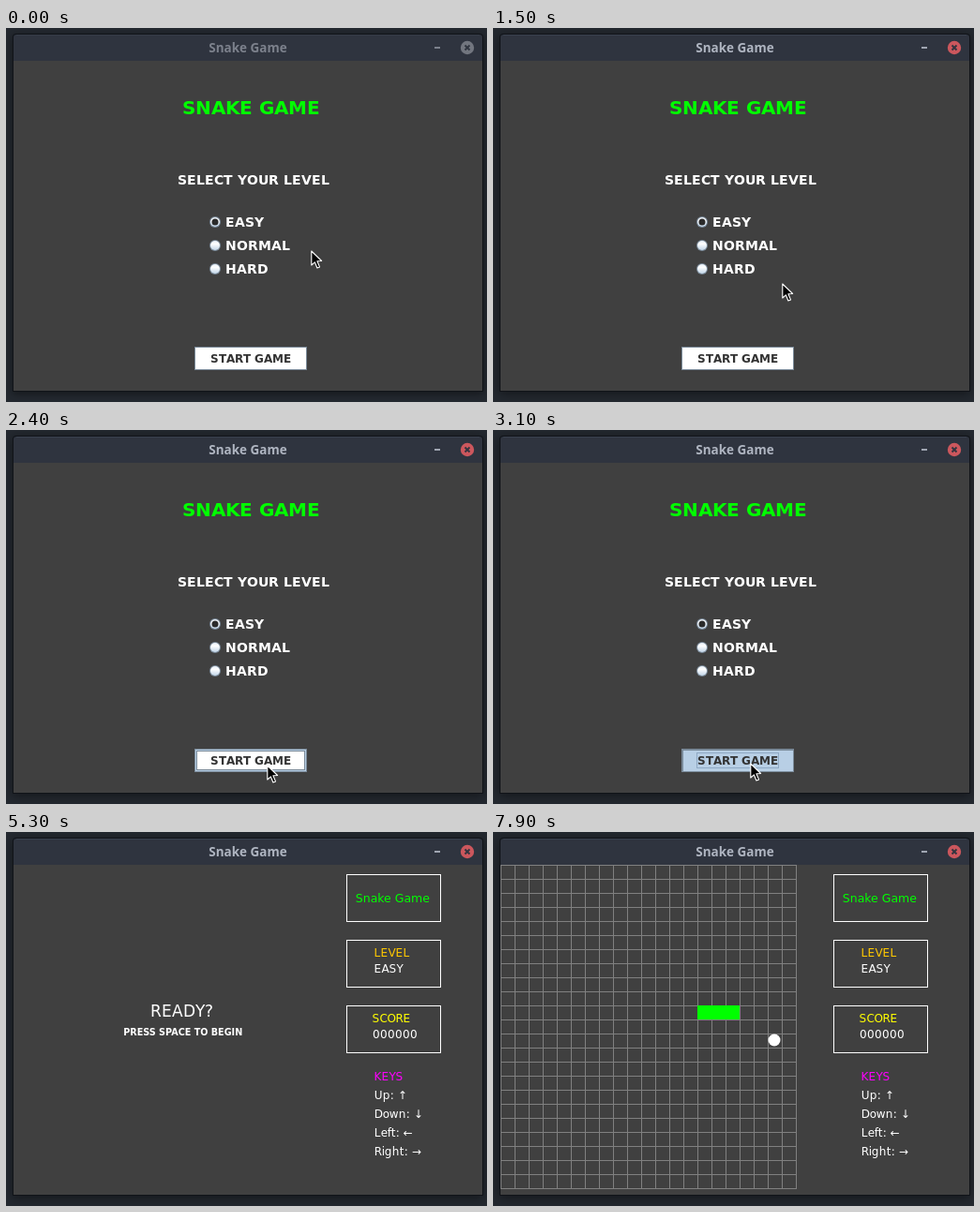
These frames come from a looping animation (513 px wide and 399 px high, 8000 ms). An HTML page with a canvas:

```html
<!DOCTYPE html>
<html lang="en">
<head>
<meta charset="utf-8">
<title>Snake Game</title>
<style>
html, body { margin: 0; width: 100%; height: 100%; overflow: hidden; background: #23282f; }
canvas { display: block; }
</style>
</head>
<body>
<canvas id="stage" width="513" height="399"></canvas>
<script>
const ctx = document.getElementById('stage').getContext('2d');
const LOOP = 8000, STEP = 100;
const FOCUS = 700, PRESS = 3100, READY = 3200, POINTER_GONE = 5300, PLAY = 7600;
const CELL = 15, COLS = 21, ROWS = 23, LEFT = 8, TOP = 35;
const SANS = '"DejaVu Sans", sans-serif';
const STEEL = '#7a8a99', PALE = '#b8cfe5', WHITE = '#ffffff', GREEN = '#00ff00';
const button = { x: 201, y: 340, w: 120, h: 25 };

// The pointer rests between these moves.
const home = { x: 325, y: 237 };
const moves = [
  { from: 100, to: 400, x: 363, y: 267 },
  { from: 1400, to: 1500, x: 308, y: 272 },
  { from: 1500, to: 2000, x: 259, y: 361 },
  { from: 2000, to: 2300, x: 306, y: 358 },
  { from: 2300, to: 2400, x: 278, y: 357 },
  { from: 2900, to: 3100, x: 274, y: 355 },
  { from: 3400, to: 3700, x: 463, y: 229 }
];

const ease = p => p * p * (3 - 2 * p);
const clamp = p => Math.min(1, Math.max(0, p));

function pointerAt(t) {
  return moves.reduce((pos, m) => {
    const k = ease(clamp((t - m.from) / (m.to - m.from)));
    return { x: pos.x + (m.x - pos.x) * k, y: pos.y + (m.y - pos.y) * k };
  }, home);
}

function inside(p, box) {
  return p.x >= box.x && p.x < box.x + box.w && p.y >= box.y && p.y < box.y + box.h;
}

function rect(x, y, w, h, color) {
  ctx.fillStyle = color;
  ctx.fillRect(x, y, w, h);
}

// A one-pixel border, drawn a given distance inside the box.
function frame({ x, y, w, h }, color, inset = 0) {
  ctx.strokeStyle = color;
  ctx.lineWidth = 1;
  ctx.strokeRect(x + inset + 0.5, y + inset + 0.5, w - 2 * inset - 1, h - 2 * inset - 1);
}

function disc(x, y, r, color) {
  ctx.fillStyle = color;
  ctx.beginPath();
  ctx.arc(x, y, r, 0, Math.PI * 2);
  ctx.fill();
}

function rounded(x, y, w, h, r, color) {
  ctx.fillStyle = color;
  ctx.beginPath();
  ctx.roundRect(x, y, w, h, [r, r, 0, 0]);
  ctx.fill();
}

function text(str, x, y, font, color) {
  ctx.font = font;
  ctx.fillStyle = color;
  ctx.fillText(str, x, y);
}

// Whole-pixel advances, as the toolkit lays out its labels.
function label(str, x, y, size, color, weight = 'bold') {
  ctx.font = `${weight} ${size}px ${SANS}`;
  ctx.fillStyle = color;
  for (const ch of str) {
    ctx.fillText(ch, x, y);
    x += Math.round(ctx.measureText(ch).width);
  }
}

function drawClose(x, y, color) {
  disc(x, y, 7.2, color);
  ctx.strokeStyle = '#2f343f';
  ctx.lineWidth = 1.8;
  ctx.beginPath();
  for (const side of [-2.5, 2.5]) {
    ctx.moveTo(x + side, y - 2.5);
    ctx.lineTo(x - side, y + 2.5);
  }
  ctx.stroke();
}

function drawWindow(focused) {
  rect(0, 0, 513, 399, '#23282f');
  ctx.save();
  ctx.shadowColor = 'rgba(0,0,0,0.45)';
  ctx.shadowBlur = focused ? 12 : 8;
  ctx.shadowOffsetY = 2;
  rounded(7, 6, 502, 382, 4, '#101318');
  ctx.restore();

  rounded(8, 7, 500, 28, 3, '#2f343f');
  rect(11, 7, 494, 1, focused ? '#3a414e' : '#363c48');
  rect(8, 35, 500, 352, '#404040');

  ctx.textAlign = 'center';
  text('Snake Game', 258, 25.7, 'bold 13.5px "Noto Sans", sans-serif', focused ? '#afb5c1' : '#7c818c');
  ctx.textAlign = 'left';
  rect(457, 20, 6, 2, focused ? '#a0a6b2' : '#7c818c');
  drawClose(492, 21, focused ? '#cc575d' : '#72767f');
}

function drawRadio(name, y, selected) {
  const fill = ctx.createLinearGradient(0, y - 6, 0, y + 6);
  fill.addColorStop(0, '#dde8f3');
  fill.addColorStop(0.35, WHITE);
  fill.addColorStop(1, PALE);
  disc(223, y, 6, STEEL);
  disc(223, y, 5, fill);
  if (selected) disc(223, y, 3.5, '#2b2b2b');
  label(name, 234, y + 5, 14, WHITE);
}

function drawButton(hover, pressed) {
  const { x, y, w, h } = button;
  rect(x, y, w, h, pressed ? PALE : WHITE);
  frame(button, STEEL);
  if (pressed) {
    rect(x, y, w, 2, STEEL);
    rect(x, y, 2, h, STEEL);
    frame({ x: 217, y: 344, w: 88, h: 17 }, '#8fa9c4');
  } else if (hover) {
    frame(button, PALE, 1);
    frame(button, STEEL, 2);
  }
  label('START GAME', 218, 357, 12, '#333333');
}

function drawMenu(hover, pressed) {
  label('SNAKE GAME', 188, 92, 20, GREEN);
  label('SELECT YOUR LEVEL', 183, 167, 14, WHITE);
  ['EASY', 'NORMAL', 'HARD'].forEach((name, i) => drawRadio(name, 207 + i * 25, i === 0));
  drawButton(hover, pressed);
}

function drawPanel() {
  const line = (str, x, y, color = WHITE) => label(str, x, y, 12, color, 'normal');
  for (let i = 0; i < 3; i++) frame({ x: 363, y: 45 + i * 70, w: 101, h: 51 }, WHITE);
  text('Snake Game', 372.8, 75, `12.5px ${SANS}`, GREEN);
  line('LEVEL', 392.5, 133, '#ffc800');
  line('EASY', 392.5, 150);
  line('SCORE', 390.5, 203, '#ffff00');
  line('000000', 391, 220);
  line('KEYS', 392.5, 265, '#ff00ff');
  ['Up: ↑', 'Down: ↓', 'Left: ←', 'Right: →'].forEach((s, i) => line(s, 392.7, 285 + i * 20));
}

function drawReady() {
  label('READY?', 154, 197, 17, WHITE, 'normal');
  text('PRESS SPACE TO BEGIN', 125.3, 217, `bold 9.65px ${SANS}`, WHITE);
}

function drawBoard(step) {
  for (let i = 0; i <= COLS; i++) rect(LEFT + i * CELL, TOP, 1, ROWS * CELL + 1, '#808080');
  for (let j = 0; j <= ROWS; j++) rect(LEFT, TOP + j * CELL, COLS * CELL + 1, 1, '#808080');
  rect(LEFT + (11 + step) * CELL, TOP + 10 * CELL, 3 * CELL, CELL, GREEN);
  disc(300, 222, 6.5, WHITE);
}

function drawPointer({ x, y }) {
  ctx.save();
  ctx.translate(Math.round(x), Math.round(y));
  const arrow = new Path2D('M.8 1V16l3.5-3.2 2.6 6.2 2.6-1.1L6.9 11.8l4.7-.3Z');
  ctx.lineJoin = 'round';
  ctx.lineWidth = 1.1;
  ctx.fillStyle = '#000000';
  ctx.strokeStyle = WHITE;
  ctx.fill(arrow);
  ctx.stroke(arrow);
  ctx.restore();
}

function draw(time) {
  const t = Math.floor(time / STEP) * STEP;
  const pointer = pointerAt(t);
  drawWindow(t >= FOCUS);
  if (t < READY) {
    drawMenu(inside(pointer, button), t >= PRESS);
  } else {
    if (t < PLAY) drawReady();
    else drawBoard((t - PLAY) / STEP);
    drawPanel();
  }
  if (t < POINTER_GONE) drawPointer(pointer);
}

const start = performance.now();
function tick() {
  draw((performance.now() - start) % LOOP);
  requestAnimationFrame(tick);
}
tick();
</script>
</body>
</html>
```
